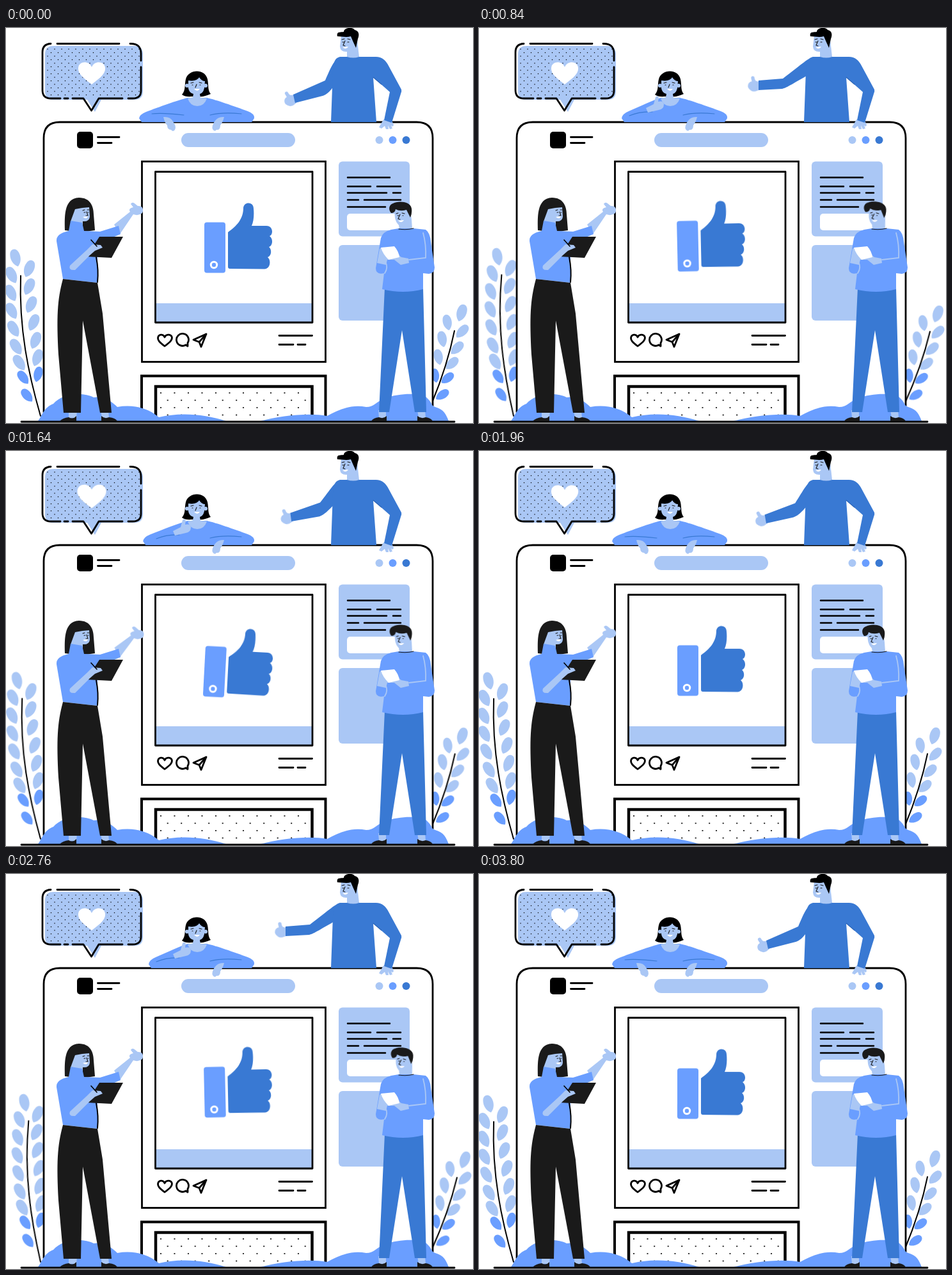
These frames come from a looping animation (730x617 px, 3840 ms). An HTML page without scripts:

```html
<!DOCTYPE html>
<html lang="en">
<head>
<meta charset="utf-8">
<title>Social feed</title>
<style>
html, body { margin: 0; width: 100%; height: 100%; overflow: hidden; background: #fff; }
svg { display: block; width: 730px; height: 617px; }
.light { fill: #aac7f5; }
.mid { fill: #6a9eff; }
.dark { fill: #3979d3; }
.white { fill: #fff; }
.ink { fill: #1a1a1a; }
.line { fill: none; stroke: #000; stroke-width: 2.8; stroke-linecap: round; stroke-linejoin: round; }
.thin { fill: none; stroke: #1a1a1a; stroke-width: 1.1; stroke-linecap: round; }
.fold { fill: none; stroke: #3979d3; stroke-width: 1.1; stroke-linecap: round; }

.sway { animation: sway .96s ease-in-out infinite alternate; }
.left-plant { --turn: 3.3deg; transform-origin: 54px 607px; }
.right-plant { --turn: 2deg; transform-origin: 667px 590px; }
.nod { --turn: 5deg; transform-origin: 623px 312px; }
@keyframes sway { to { transform: rotate(var(--turn)); } }

.beat { transform-origin: 134px 71px; animation: beat .96s ease-in-out infinite; }
@keyframes beat { 0%, 87%, 100% { transform: none; } 43% { transform: scale(1.25); } }

.swing { transform-origin: 363px 328px; animation: swing 1.92s ease-in-out infinite; }
@keyframes swing {
  0%, 100% { transform: translate(0, 0) rotate(0deg); }
  25% { transform: translate(-1px, -7px) rotate(-4deg); }
  74% { transform: translate(1px, 6px) rotate(5deg); }
}

.wave { transform-origin: 166px 318px; animation: wave .96s ease-in-out infinite; }
@keyframes wave { 0%, 87%, 100% { transform: rotate(0deg); } 43% { transform: rotate(9deg); } }

.man-arm { animation: man-arm 1.92s ease-in-out infinite; }
@keyframes man-arm {
  0%, 92%, 100% {
    d: path("M524 45C512 49 508 62 499 82L449 104L452 117L495 106C504 103 508 98 524 74Z");
    animation-timing-function: ease-out;
  }
  17%, 44% { d: path("M524 45C514 47 508 54 475 79L437 82L437 97L474 95C482 93 490 87 524 68Z"); }
  71%, 75% { d: path("M524 45C514 47 508 54 473 77L434 80L433 94L474 95C482 93 490 87 524 68Z"); }
}
.man-hand { transform-origin: 451px 110px; animation: man-hand 1.92s ease-in-out infinite; }
@keyframes man-hand {
  0%, 92%, 100% { transform: translate(0, 0) rotate(0deg); animation-timing-function: ease-out; }
  17%, 44% { transform: translate(-14px, -20.5px) rotate(20deg); }
  71%, 75% { transform: translate(-17px, -23px) rotate(22deg); }
}

.girl-arm { animation: girl-arm 1.92s ease-in-out infinite; }
@keyframes girl-arm {
  0%, 3%, 94%, 100% { d: path("M284 109C268 113 240 123 219 131Q209 135 208 141L212 147L300 147L300 110Z"); }
  18%, 75% { d: path("M284 109C272 113 252 122 234 130Q224 134 223 141L227 147L300 147L300 110Z"); }
}
.resting { animation: resting 1.92s step-end infinite; }
.raised { animation: raised 1.92s step-end infinite; }
@keyframes resting { 0%, 86% { opacity: 1; } 10% { opacity: 0; } }
@keyframes raised { 0%, 86% { opacity: 0; } 10% { opacity: 1; } }
</style>
</head>
<body>
<svg viewBox="0 0 730 617">
  <defs>
    <path id="leaf" d="M0 14C-7 9-9 0-7-7C-5-16 5-16 7-7C9 0 7 9 0 14Z"/>
    <pattern id="specks" width="11" height="11" patternUnits="userSpaceOnUse" x="63" y="31">
      <circle cx="2" cy="2" r=".75"/><circle cx="7.5" cy="7.5" r=".75"/>
    </pattern>
    <pattern id="dots" width="21.5" height="23" patternUnits="userSpaceOnUse" x="238" y="567">
      <circle cx="4" cy="3" r="1.1"/><circle cx="14.7" cy="14.5" r="1.1"/>
    </pattern>
  </defs>

  <g class="sway left-plant">
    <g class="light">
      <use href="#leaf" transform="translate(15 359) rotate(-16)"/>
      <use href="#leaf" transform="translate(9 386) rotate(-27)"/>
      <use href="#leaf" transform="translate(8 414) rotate(-27)"/>
      <use href="#leaf" transform="translate(9 442) rotate(-28)"/>
      <use href="#leaf" transform="translate(12 470) rotate(-30)"/>
      <use href="#leaf" transform="translate(16 498) rotate(-32)"/>
      <use href="#leaf" transform="translate(21 523) rotate(-34)"/>
      <use href="#leaf" transform="translate(36 376) rotate(22)"/>
      <use href="#leaf" transform="translate(36 404) rotate(24)"/>
      <use href="#leaf" transform="translate(39 432) rotate(24)"/>
      <use href="#leaf" transform="translate(43 460) rotate(24)"/>
      <use href="#leaf" transform="translate(46 488) rotate(22)"/>
      <use href="#leaf" transform="translate(49 515) rotate(20)"/>
    </g>
    <g class="mid">
      <use href="#leaf" transform="translate(27 546) rotate(-38) scale(.88)"/>
      <use href="#leaf" transform="translate(33 574) rotate(-40) scale(.88)"/>
      <use href="#leaf" transform="translate(50 541) rotate(14) scale(.88)"/>
    </g>
    <path class="line" stroke-width="2" style="stroke-width:2" d="M54 606C35 540 20 470 23 387"/>
  </g>
  <g class="sway right-plant">
    <g class="light">
      <use href="#leaf" transform="translate(712 445) rotate(18)"/>
      <use href="#leaf" transform="translate(690 460) rotate(-12) scale(.9)"/>
      <use href="#leaf" transform="translate(713 474) rotate(44) scale(.92)"/>
      <use href="#leaf" transform="translate(682 486) rotate(-12) scale(.92)"/>
      <use href="#leaf" transform="translate(705 500) rotate(46) scale(.92)"/>
      <use href="#leaf" transform="translate(676 514) rotate(-12) scale(.9)"/>
      <use href="#leaf" transform="translate(697 524) rotate(48) scale(.9)"/>
    </g>
    <g class="mid">
      <use href="#leaf" transform="translate(671 543) rotate(-10) scale(.8)"/>
      <use href="#leaf" transform="translate(690 547) rotate(52) scale(.85)"/>
      <use href="#leaf" transform="translate(682 573) rotate(56) scale(.85)"/>
    </g>
    <path class="line" style="stroke-width:2" d="M666 585Q690 527 701 473"/>
  </g>

  <!-- window -->
  <path class="white" d="M59 612V172Q59 147 84 147H642Q667 147 667 172V612Z"/>
  <path class="line" d="M59 600V172Q59 147 84 147H642Q667 147 667 172V590"/>
  <rect x="111" y="162" width="25" height="26" rx="5"/>
  <path class="line" d="M143.500 170.500H177M143.500 179.500H165"/>
  <rect class="light" x="274" y="164" width="178" height="22" rx="11"/>
  <circle class="light" cx="583.500" cy="175" r="6"/>
  <circle class="mid" cx="604.500" cy="175" r="6"/>
  <circle class="dark" cx="625.500" cy="175" r="6"/>

  <!-- side cards -->
  <rect class="light" x="520" y="208.500" width="111" height="117" rx="6"/>
  <rect class="light" x="520" y="339" width="111" height="118" rx="6"/>
  <path class="line" style="stroke-width:2.500" d="M534 233.500H600M534 247.500H570M580 247.500H617M534 257.500H595M605 257.500H617M534 268.500H551M560 268.500H617M534 279.500H593"/>
  <rect class="white" x="533" y="290" width="84" height="26" rx="5"/>

  <!-- posts -->
  <g class="line" style="stroke-linejoin:miter">
    <rect x="212.500" y="208.500" width="287" height="313"/>
    <rect class="light" x="234" y="430" width="245" height="29" stroke="none"/>
    <path d="M212 609V543.500H499.500V609" style="stroke-width:4"/>
    <path d="M234 607V560H478.500V607" style="stroke-width:4.500"/>
  </g>
  <rect class="light" x="234" y="430" width="244" height="29"/>
  <rect class="line" x="233.500" y="224.500" width="245.500" height="235.500"/>
  <rect x="237" y="563" width="239" height="46" fill="url(#dots)"/>
  <path class="line" d="M248 497C240 491 236 487 238 482C240 478 246 478 248 483C250 478 257 478 259 482C261 487 256 491 248 497ZM284 497L281 495A9.500 9.500 0 1 1 284 492ZM313 478L293 487L302 490.500L305 498ZL302 490.500"/>
  <path class="line" d="M427 480.500H478.500M427 494.500H449M456 494.500H468"/>
  <g class="swing">
    <rect class="mid" x="310" y="303.500" width="33" height="79" rx="4"/>
    <circle class="mid" cx="325" cy="370" r="4.700" stroke="#fff" stroke-width="3"/>
    <path class="dark" d="M347 319C361 309 371 298 371 281C372 271 387 271 387 282C388 293 387 302 384 309H407C418 309 418 323 412 325C418 329 417 340 411 342C416 346 415 356 409 358C415 363 413 376 404 376.500L350 376Q347 376 347 373Z"/>
  </g>

  <!-- speech bubble -->
  <path class="light" id="bubble" d="M74 28H201Q214 28 214 41V99Q214 112 201 112H149L139 131L127 112H74Q61 112 61 99V41Q61 28 74 28Z"/>
  <rect x="63" y="31" width="149" height="78" fill="url(#specks)"/>
  <path class="line" d="M57 92V38Q57 25 70 24.500M80 24.500H177M194 24.500Q211 24 211 40V51M211 61V98Q211 110 198 110H191M57 92V97Q57 110 70 110H85M91 110H97M104 110H121L133.500 129L145 110H182"/>
  <path class="white beat" d="M134 88C119 77 112 70 113 62C114 52 129 50 134 61C139 50 154 52 155 62C156 70 149 77 134 88Z"/>

  <!-- man above the window -->
  <path class="light man-hand" d="M454 117L450 104C445 106 443 105 441 101C439 98 435 100 436 103L439 108C435 110 434 115 437 119Q443 124 449 121Z"/>
  <path class="dark man-arm" d="M524 45C512 49 508 62 499 82L449 104L452 117L495 106C504 103 508 98 524 74Z"/>
  <path class="light" d="M590 143L603 145L606 151Q605 156 602 152L604 157L600 158L597 152L598 158H594L592 153L587 157L583 155Z"/>
  <path class="dark" d="M522 45H578C588 45 594 51 598 59L618 96Q619 99 617 103L603 148L591 144L600 100L574 77L579 147H508L511 66C512 53 514 47 522 45Z"/>
  <path class="thin" style="stroke:#2b64b5" d="M574 77L587 88"/>
  <path class="light" d="M524 11L522 29Q523 38 533 37V45Q543 48 552 45L548 10Z"/>
  <path d="M518 13C516 5 523 7 528 6C528-1 542-2 545 3C553 5 552 12 550 17L547 31L542 20L539 13C532 15 525 13 518 13Z"/>
  <path class="thin" d="M525 18L529 17M534 17L538 18M526 22L528 22M534 22L536 22M530 20L527 27L530 28"/>
  <path class="white" d="M526 30L535 29Q532 35 526 30Z"/>

  <!-- girl above the window -->
  <path class="mid girl-arm" d="M284 109C268 113 240 123 219 131Q209 135 208 141L212 147L300 147L300 110Z"/>
  <path class="mid" d="M284 109H314C328 112 356 122 378 130Q389 134 388 141L384 147H272Z"/>
  <path d="M275 104C281 98 279 88 281 80C285 64 311 63 315 80C317 90 315 97 320 103Q309 108 302 107H289Q281 108 275 104Z"/>
  <path class="light" d="M285 82Q298 84 302 77Q306 83 311 83L310 94Q308 102 303 103L304 109L314 110Q310 122 299 122Q288 122 284 110L292 108L293 103Q286 101 285 94Z"/>
  <circle class="light" cx="283" cy="90" r="3"/><circle class="light" cx="312" cy="90" r="3"/>
  <path class="thin" d="M289 86L293 85M302 85L306 86M291 89H292M303 89H304M298 88L296 93"/>
  <path class="white" d="M294 95H303Q299 101 294 95Z"/>
  <path class="fold" d="M319 136Q338 131 368 134"/>
  <path class="light" d="M341 139Q331 138 326 146Q321 154 323 158Q326 163 329 159Q335 160 335 152Q339 147 341 139Z"/>
  <g class="resting">
    <path class="fold" d="M228 134Q245 132 278 136"/>
    <path class="light" d="M246 139Q257 138 261 146Q267 154 264 159Q261 163 258 159Q252 159 252 152Q248 148 246 139Z"/>
  </g>
  <g class="raised">
    <path class="fold" d="M235 137Q252 130 271 131"/>
    <path class="light" d="M261 125L273 119L276 108Q278 105 281 108L280 115Q288 113 289 119Q289 127 281 128L264 132Z"/>
  </g>

  <!-- hills -->
  <path class="mid" d="M50 614C57 604 60 592 74 587C87 571 120 568 137 577C153 574 166 584 174 592C196 588 220 592 239 608C274 600 310 603 344 614Z"/>
  <path class="mid" d="M398 614C430 605 475 601 502 606C522 595 540 588 563 592C575 592 579 584 592 578C614 571 641 569 656 576C667 585 664 590 671 592C685 596 688 604 692 614Z"/>
  <path class="line" d="M24 615H701"/>

  <!-- woman with clipboard -->
  <path class="ink" d="M92 316C92 298 89 266 114 265C132 265 137 279 137 291L139 316Q118 320 92 316Z"/>
  <path class="light" d="M108 283L119 281L130 280L131 295Q130 303 120 302V312H101V302Z"/>
  <path class="thin" d="M120 285L123 284M127 284L130 284M122 288H124M128 288H129M126 287L128 293L125 293"/>
  <path class="white" d="M120 295L128 294Q126 300 120 295Z"/>
  <g class="wave light">
    <path d="M169 307L194 287C191 283 195 281 199 280L195 275Q197 271 201 274L206 278C213 277 216 283 213 289Q207 294 199 291L178 322Z"/>
  </g>
  <path class="mid" d="M101 301L119 304L122 317L147 318L176 309L179 322L143 337L143 398L89 392L79 333Q78 321 98 317Z"/>
  <path class="line" style="stroke-width:2" d="M141 358Q145 378 143 397"/>
  <path class="ink" d="M146 326H183L165 359L126 357Z"/>
  <path class="light" d="M100 371L126 347L135 338L148 339L151 343L139 348L131 355L108 378Q97 379 100 371Z"/>
  <path class="line" style="stroke-width:1.600" d="M133 331L142 341"/>
  <path class="light" d="M98 598H111L110 609H98ZM148 598H160L161 609H150Z"/>
  <path class="ink" d="M89 392L143 398L151 446L165 601H147L120 457L117 601H90L82 510C79 452 80 425 89 392Z"/>
  <path class="ink" d="M84 614Q89 609 98 608Q105 612 110 606V614ZM149 614V606Q154 611 161 608Q171 609 174 614Z"/>

  <!-- man with phone -->
  <g class="sway nod">
    <path class="light" d="M607 286L632 285L634 299L635 314H615L614 308Q609 303 608 296Z"/>
    <path class="ink" d="M602 289C597 283 599 276 605 274C612 270 632 270 634 282Q635 290 632 296L628 288L626 284Q616 287 609 283Q608 289 602 289Z"/>
    <path class="thin" d="M610 290L613 289M619 289L623 290M612 293H614M620 293H621M616 291L613 298L616 299"/>
    <path class="white" d="M613 301L622 300Q619 306 613 301Z"/>
  </g>
  <path class="light" d="M582 597H594V609H583ZM643 597H655L656 609H645Z"/>
  <path class="dark" d="M592 406L652 406L657 600H639L619 472L599 600H583Z"/>
  <path class="mid" d="M614 313H637L656 315Q663 320 664 334L670 374Q670 383 661 384L652 383V408Q621 416 588 408L591 383Q578 386 578 375L586 328Q589 318 602 315Z"/>
  <path class="thin" d="M614 314Q626 316 637 313"/>
  <path class="fold" style="stroke:#aac7f5;stroke-width:1.800" d="M652 320Q657 338 656 359L630 362M593 365Q598 374 592 383"/>
  <path class="light" d="M584 345Q588 341 594 344L611 352L618 358L629 360L630 367L617 370L607 362L596 362L594 370L580 367Z"/>
  <path class="white" d="M586 343L607 341Q614 349 615 358L598 362Q589 353 586 343Z"/>
  <path class="ink" d="M571 614Q574 609 583 608Q590 611 595 606V614ZM643 614V606Q649 611 656 608Q664 609 667 614Z"/>
</svg>
</body>
</html>
```
